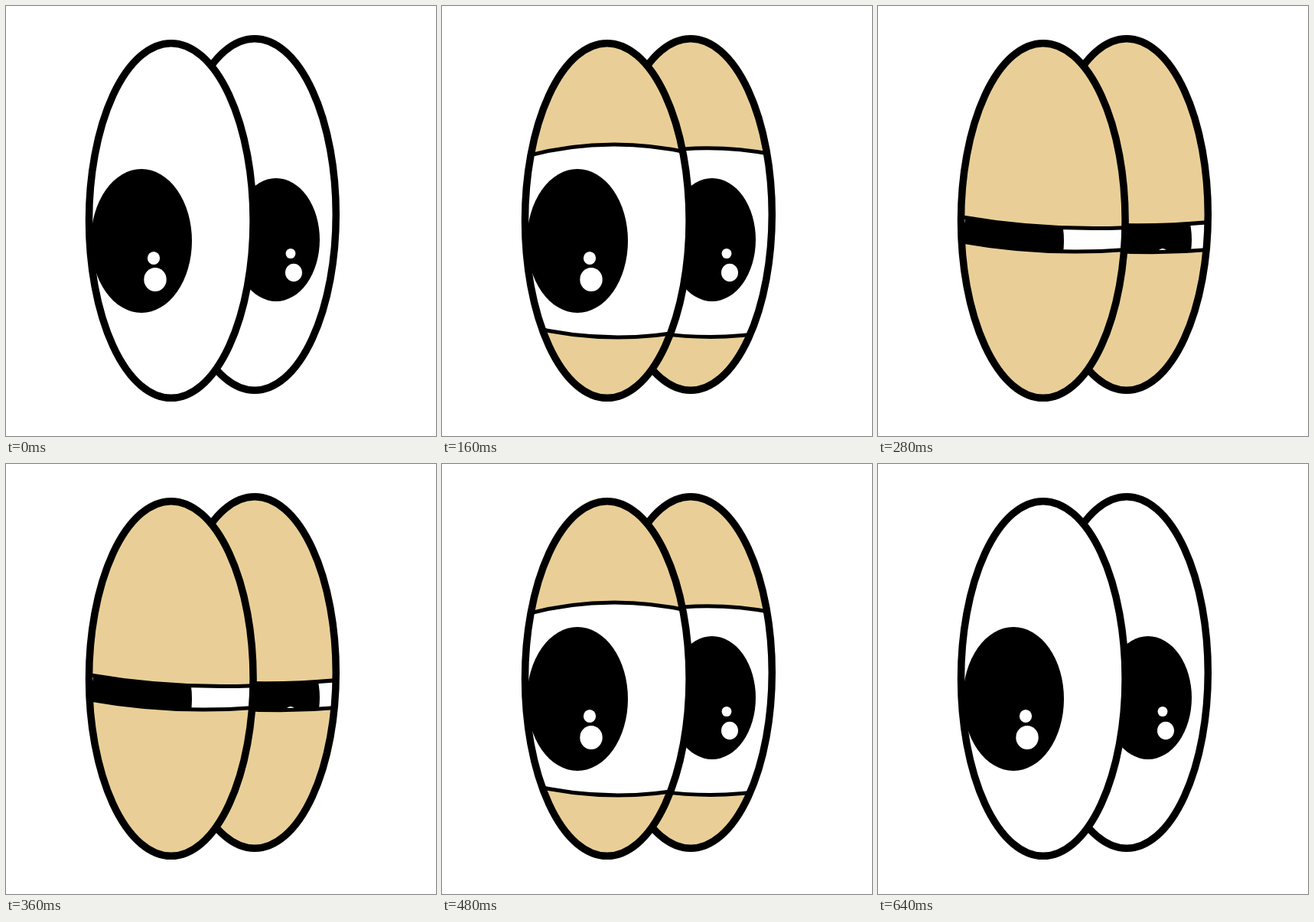
These frames come from a looping animation (562 px wide and 562 px high, 680 ms). An HTML page with a canvas:

```html
<!DOCTYPE html>
<html lang="en">
<head>
<meta charset="utf-8">
<title>Blinking eyes</title>
<style>
  html, body { margin: 0; width: 100%; height: 100%; overflow: hidden; background: #fff; }
  canvas { display: block; }
</style>
</head>
<body>
<canvas id="stage" width="562" height="562"></canvas>
<script>
const ctx = document.getElementById('stage').getContext('2d');
const SIZE = 562, STEP_MS = 40, STEPS = 17, CLOSED = 8, MEET_Y = 304;
const SKIN = '#e9cf97', INK = '#000', WHITE = '#fff';

// Shapes are centre and radii. Each lid has a starting height, speed and
// acceleration per step, and a tilt when wide open, half open and nearly shut.
const farEye = {
  shape: { x: 325, y: 272.5, rx: 106.3, ry: 229.8 },
  pupil: { x: 353, y: 305.5, rx: 57, ry: 80.5 },
  glints: [{ x: 372, y: 323.5, rx: 6.4, ry: 6.6 }, { x: 376, y: 348.5, rx: 11, ry: 11.7 }],
  lidX: 350,
  upper: { start: 14.5, speed: 48, accel: -1.3, tilt: [13.5, -5.7, -1] },
  lower: { start: 481.3, speed: 1.9, accel: -3.53, tilt: [-11, 5.7, 1] }
};
const nearEye = {
  shape: { x: 215.8, y: 280.5, rx: 107.3, ry: 231.8 },
  pupil: { x: 177, y: 307, rx: 66, ry: 94 },
  glints: [{ x: 193, y: 329.5, rx: 8.1, ry: 8.6 }, { x: 195, y: 357.5, rx: 14.7, ry: 15.6 }],
  lidX: 216,
  upper: { start: 18.1, speed: 43.6, accel: -0.71, tilt: [-7.1, 0.5, 6.5] },
  lower: { start: 482.4, speed: 2, accel: -3.6, tilt: [6.6, 1, 5] }
};
const UPPER_BEND = [16, 9, -5];
const LOWER_BEND = [-14, -8.5, -6];

function ellipsePath({ x, y, rx, ry }) {
  ctx.beginPath();
  ctx.ellipse(x, y, rx, ry, 0, 0, Math.PI * 2);
}

function fillEllipse(shape, color) {
  ellipsePath(shape);
  ctx.fillStyle = color;
  ctx.fill();
}

const mix = (a, b, t) => a + (b - a) * Math.min(1, Math.max(0, t));

// Wide open is step 2, half open step 5, nearly shut step 7.
function blend([open, half, shut], step) {
  return step < 5 ? mix(open, half, (step - 2) / 3) : mix(half, shut, (step - 5) / 2);
}

const lidHeight = ({ start, speed, accel }, step) => start + speed * step + accel * step * step;

function drawLid(x, height, tilt, bend, farEdge) {
  const yAt = u => height + tilt * u + bend * u * u;
  const reach = 1.5, span = reach * 100;
  const edge = new Path2D();
  edge.moveTo(x - span, yAt(-reach));
  edge.quadraticCurveTo(x, height - bend * reach * reach, x + span, yAt(reach));
  const area = new Path2D(edge);
  area.lineTo(x + span, farEdge);
  area.lineTo(x - span, farEdge);
  ctx.fillStyle = SKIN;
  ctx.fill(area);
  ctx.lineWidth = 5;
  ctx.stroke(edge);
}

function drawLids({ lidX, upper, lower }, step) {
  const upperY = Math.min(MEET_Y, lidHeight(upper, step));
  const lowerY = Math.max(MEET_Y, lidHeight(lower, step));
  drawLid(lidX, upperY, blend(upper.tilt, step), blend(UPPER_BEND, step), 0);
  drawLid(lidX, lowerY, blend(lower.tilt, step), blend(LOWER_BEND, step), SIZE);
}

function drawEye(eye, step) {
  ctx.save();
  ellipsePath(eye.shape);
  ctx.clip();
  ctx.fillStyle = WHITE;
  ctx.fillRect(0, 0, SIZE, SIZE);
  fillEllipse(eye.pupil, INK);
  eye.glints.forEach(glint => fillEllipse(glint, WHITE));
  if (step > 0) drawLids(eye, step);
  ctx.restore();
  ellipsePath(eye.shape);
  ctx.lineWidth = 9.5;
  ctx.stroke();
}

function render(time) {
  const index = Math.floor(time / STEP_MS) % STEPS;
  const step = CLOSED - Math.abs(index - CLOSED);
  ctx.fillStyle = WHITE;
  ctx.fillRect(0, 0, SIZE, SIZE);
  ctx.strokeStyle = INK;
  drawEye(farEye, step);
  drawEye(nearEye, step);
}

let origin;
function tick(now) {
  origin ??= now;
  render(Math.max(0, now - origin));
  requestAnimationFrame(tick);
}
render(0);
requestAnimationFrame(tick);
</script>
</body>
</html>
```
